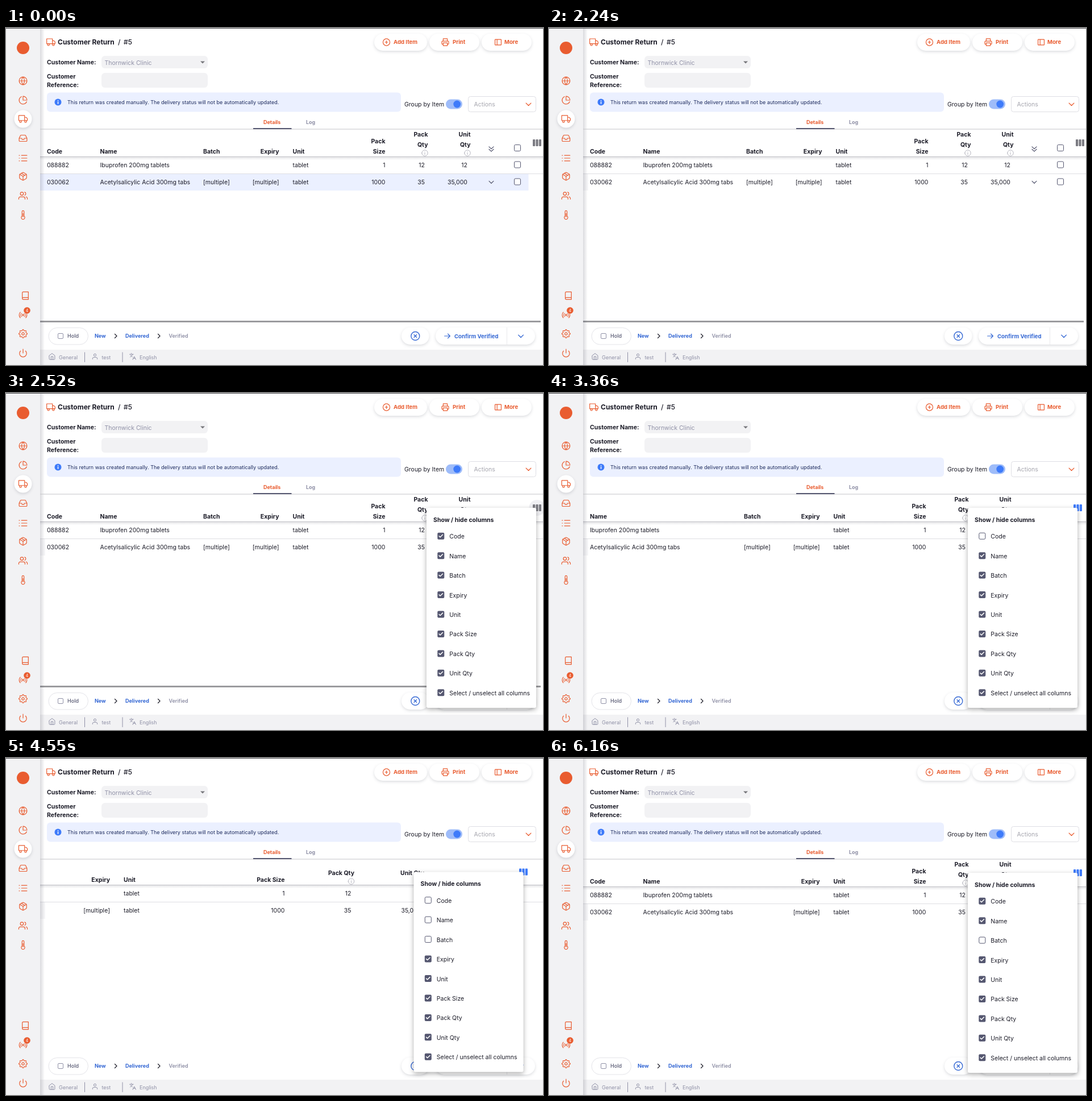
These frames come from a looping animation (945 px wide and 593 px high, 6.93 s). An HTML page:

```html
<!DOCTYPE html>
<html lang="en">
<head>
<meta charset="utf-8">
<title>Customer Return</title>
<style>
html, body { margin: 0; width: 100%; height: 100%; overflow: hidden; background: #fff; }
svg { display: block; width: 100vw; height: 100vh; font-family: Inter, sans-serif; }
text { white-space: pre; }
.lift { filter: drop-shadow(0 2px 2.5px rgba(40, 41, 61, .16)); }
.paper { filter: drop-shadow(0 3px 4px rgba(0, 0, 0, .32)); }
</style>
</head>
<body>
<svg viewBox="0 0 945 593">
  <defs>
    <linearGradient id="side"><stop stop-color="#28293d" stop-opacity=".17"/><stop offset="1" stop-color="#28293d" stop-opacity="0"/></linearGradient>
    <linearGradient id="under" x2="0" y2="1"><stop stop-color="#28293d" stop-opacity=".13"/><stop offset="1" stop-color="#28293d" stop-opacity="0"/></linearGradient>
  </defs>
  <g id="table"></g>
  <g id="chrome"></g>
  <g id="menu"></g>
</svg>
<script>
const LOOP = 6930, STEP = 70;
const INK = '#1c1c28', GREY = '#8f90a6', SLATE = '#555770', BLUE = '#3e7bfa', LINK = '#3568d4',
      ORANGE = '#e95c30', PANEL = '#f2f2f4', TINT = '#ebf0ff';
const $ = id => document.getElementById(id);

// Text is placed by the middle of its capitals.
const text = (x, y, str, { size = 10.5, weight = 400, fill = INK, anchor = 'start' } = {}) =>
  `<text x="${x}" y="${y + size * .364}" font-size="${size}" font-weight="${weight}" fill="${fill}" text-anchor="${anchor}">${str}</text>`;
const bold = (x, y, str, o) => text(x, y, str, { weight: 700, ...o });
const rect = (x, y, w, h, fill, rx = 0, more = '') =>
  `<rect x="${x}" y="${y}" width="${w}" height="${h}" rx="${rx}" fill="${fill}" ${more}/>`;
const disc = (x, y, r, fill, more = '') => `<circle cx="${x}" cy="${y}" r="${r}" fill="${fill}" ${more}/>`;
const ring = (x, y, r) => `M${x - r} ${y}a${r} ${r} 0 1 0 ${2 * r} 0a${r} ${r} 0 1 0 ${-2 * r} 0z`;

const gear = Array.from({ length: 97 }, (_, i) => {
  const a = i / 96 * 2 * Math.PI, r = 9.4 + 1.4 * Math.cos(8 * a);
  return `${i ? 'L' : 'M'}${(12 + r * Math.cos(a)).toFixed(2)} ${(12 + r * Math.sin(a)).toFixed(2)}`;
}).join('');

const shapes = {
  globe: ring(12, 12, 10) + 'M2 12h20M12 2a15.3 15.3 0 0 1 0 20a15.3 15.3 0 0 1 0-20z',
  pie: 'M21.2 15.9A10 10 0 1 1 8 2.8M22 12A10 10 0 0 0 12 2v10z',
  truck: 'M1 3h15v13H1zM16 8h4l3 3v5h-7z' + ring(5.5, 18.5, 2.5) + ring(18.5, 18.5, 2.5),
  inbox: 'M22 12h-6l-2 3h-4l-2-3H2M5.4 5.1L2 12v6a2 2 0 0 0 2 2h16a2 2 0 0 0 2-2v-6l-3.4-6.9A2 2 0 0 0 16.8 4H7.2a2 2 0 0 0-1.8 1.1z',
  list: 'M8 5h14M8 12h14M8 19h14M2 5h1M2 12h1M2 19h1',
  box: 'M16.5 9.4l-9-5.2M21 16V8l-1-1.7-7-4h-2l-7 4L3 8v8l1 1.7 7 4h2l7-4zM3.3 7L12 12l8.7-5M12 22V12',
  users: 'M17 21v-2a4 4 0 0 0-4-4H5a4 4 0 0 0-4 4v2M23 21v-2a4 4 0 0 0-3-3.9M16 3.1a4 4 0 0 1 0 7.8' + ring(9, 7, 4),
  thermo: 'M14.5 14.8V3.5a2.5 2.5 0 0 0-5 0v11.3a4.5 4.5 0 1 0 5 0zM12 8v9',
  book: 'M4 19.5A2.5 2.5 0 0 1 6.5 17H20M6.5 2H20v20H6.5A2.5 2.5 0 0 1 4 19.5v-15A2.5 2.5 0 0 1 6.5 2z',
  radio: ring(12, 12, 2) + 'M16.2 7.8a6 6 0 0 1 0 8.4M7.8 16.2a6 6 0 0 1 0-8.4M19 5a10 10 0 0 1 0 14M5 19a10 10 0 0 1 0-14',
  gear: gear + ring(12, 12, 3.2),
  power: 'M18.4 6.6a9 9 0 1 1-12.8 0M12 2v10',
  home: 'M3 9l9-7 9 7v11a2 2 0 0 1-2 2H5a2 2 0 0 1-2-2zM9 22V12h6v10',
  user: 'M20 21v-2a4 4 0 0 0-4-4H8a4 4 0 0 0-4 4v2' + ring(12, 7, 4),
  language: 'M5 8l6 6M4 14l6-6 2-3M2 5h12M7 2h1M22 22l-5-10-5 10M14 18h6',
  printer: 'M6 9V2h12v7M6 18H4a2 2 0 0 1-2-2v-5a2 2 0 0 1 2-2h16a2 2 0 0 1 2 2v5a2 2 0 0 1-2 2h-2M6 14h12v8H6z',
  panel: 'M4 4h16a1 1 0 0 1 1 1v14a1 1 0 0 1-1 1H4a1 1 0 0 1-1-1V5a1 1 0 0 1 1-1zM9 4v16',
  plus: ring(12, 12, 10) + 'M12 8v8M8 12h8',
  cancel: ring(12, 12, 10) + 'M15 9l-6 6M9 9l6 6',
  info: ring(12, 12, 10) + 'M12 11v6M12 7v.5',
  arrow: 'M3 12h18M14 5l7 7-7 7',
  down: 'M5 9l7 7 7-7',
  right: 'M9 5l7 7-7 7',
  downs: 'M5 12.5l7 6.5 7-6.5M5 5l7 6.5L19 5',
  check: 'M20 6L9 17l-5-5'
};
const icon = (name, x, y, size, color = ORANGE, width = 1.2) =>
  `<path d="${shapes[name]}" transform="translate(${x - size / 2} ${y - size / 2}) scale(${size / 24})" fill="none" stroke="${color}" stroke-width="${width * 24 / size}" stroke-linecap="round" stroke-linejoin="round"/>`;
const checkbox = (x, y, on, s = 11) => on
  ? rect(x - 6, y - 6, 12, 12, SLATE, 2) + icon('check', x, y, 9.5, '#fff', 1.5)
  : rect(x - s / 2, y - s / 2, s, s, '#fff', 2, `stroke="${SLATE}"`);
const pill = (x, y, w, h, more = 'class="lift"') => rect(x, y, w, h, '#fff', h / 2, more);

function chrome() {
  const small = { size: 9 }, label = { size: 9.6, fill: ORANGE }, foot = { size: 9, fill: GREY };
  const nav = [['globe', 93], ['pie', 127], ['truck', 160], ['inbox', 194], ['list', 229], ['box', 261],
               ['users', 295], ['thermo', 329], ['radio', 505], ['gear', 538], ['power', 572]];
  const buttons = [[648, 93, 'plus', 669.5, 682, 'Add Item'], [745, 88, 'printer', 773, 786, 'Print'],
                   [837, 88, 'panel', 866, 877, 'More']];
  return rect(60, 566, 885, 27, PANEL) + rect(60, 0, 8, 593, 'url(#side)') + rect(0, 0, 60, 593, PANEL)
    + rect(0, 0, 945, 1, '#4c4c50')
    + disc(30, 35, 11, ORANGE) + disc(30, 160, 15.5, '#fff', 'class="lift"')
    + nav.map(([name, y]) => icon(name, 30, y, 16.5)).join('')
    + icon('book', 34, 471, 16) + disc(37, 497, 5.8, ORANGE)
    + text(37, 497, '4', { size: 7, fill: '#fff', anchor: 'middle' })
    // page head
    + icon('truck', 79, 25, 16) + bold(91, 24.5, 'Customer Return', { size: 12 })
    + text(197, 24.5, '/', { size: 12, weight: 500 }) + text(207, 24.5, '#5', { size: 12, weight: 500 })
    + buttons.map(([x, w, name, ix, tx, s]) =>
        pill(x, 10, w, 30) + icon(name, ix, 25, 14.5) + bold(tx, 25, s, label)).join('')
    + bold(72, 60, 'Customer Name:') + bold(72, 85, 'Customer') + bold(72, 100, 'Reference:')
    + rect(168, 49, 187, 22, PANEL, 6) + rect(168, 79, 187, 26, PANEL, 6)
    + text(173.5, 61.5, 'Thornwick Clinic', { fill: GREY })
    + '<path d="M342 58.5h8l-4 4z" fill="#77777c"/>'
    + rect(72, 113.5, 623, 34, TINT, 6) + disc(91.5, 130.5, 6, BLUE)
    + rect(90.8, 129.5, 1.5, 4.2, '#fff') + rect(90.8, 127, 1.5, 1.5, '#fff')
    + text(108, 130.5, 'This return was created manually. The delivery status will not be automatically updated.', { size: 9, fill: '#1d2b5c' })
    + text(701, 134, 'Group by Item') + rect(774, 125.5, 29, 17, '#9ebcf9', 8.5) + disc(793.7, 134, 6.4, BLUE)
    + rect(813.5, 120.5, 119, 27, '#fff', 4, 'stroke="#dedee4"') + text(823.5, 134, 'Actions', { fill: '#a5a5ae' })
    + icon('down', 919.5, 134, 15, ORANGE, 1.4)
    + bold(453, 166, 'Details', { size: 9, fill: ORANGE }) + bold(528, 166, 'Log', { size: 9, fill: GREY })
    + rect(60, 177.5, 885, 1, '#c5c5ca') + rect(435, 176, 67.5, 2, SLATE)
    // status bar
    + pill(75, 527.5, 69.5, 29.5, 'stroke="#e4e4e9"') + rect(91.5, 537.5, 9, 9, '#fff', 1.5, `stroke="${GREY}"`)
    + text(108, 542, 'Hold', { size: 9, weight: 500, fill: SLATE })
    + bold(156, 542, 'New', { size: 9, fill: LINK }) + icon('right', 193, 542, 12, INK)
    + bold(210, 542, 'Delivered', { size: 9, fill: LINK }) + icon('right', 269, 542, 12, INK)
    + text(286.5, 542, 'Verified', { size: 9, weight: 600, fill: GREY })
    + pill(696, 527, 48.5, 30) + icon('cancel', 720.3, 542, 18, LINK, 1.4)
    + pill(756, 527, 175, 30) + rect(881, 527, 1, 30, '#e8e8ec')
    + icon('arrow', 776.5, 542, 13, LINK) + bold(789, 542.5, 'Confirm Verified', { size: 9.6, fill: LINK })
    + icon('down', 906, 542, 15, LINK, 1.4)
    + icon('home', 81, 578, 13, GREY, 1) + text(93, 579.5, 'General', foot) + rect(138, 570.5, 1, 17.5, GREY)
    + icon('user', 156.5, 578, 12.5, GREY, 1) + text(168.5, 579.5, 'test', foot) + rect(204.5, 570.5, 1, 17.5, GREY)
    + icon('language', 223, 578, 13, GREY, 1) + text(235, 579.5, 'English', foot);
}

const NAMES = ['Code', 'Name', 'Batch', 'Expiry', 'Unit', 'Pack Size', 'Pack Qty', 'Unit Qty'];
// left: Code, Name, Batch, Unit; right: Expiry, Pack Size, Pack Qty, Unit Qty
const full = { code: 72, name: 165.5, batch: 347, expiry: 480.5, unit: 504.5, size: 667.5, pack: 742.5, qty: 817.5,
               icon: 0, menu: 740, off: '' };
const snug = { ...full, expiry: 476.5, unit: 500.5, size: 663.5, pack: 738.5, qty: 813.5, icon: -4, menu: 737 };
const views = [
  [0, full],
  [3360, { ...snug, code: 0, name: 72, batch: 343, off: 'Code' }],
  [3850, { wide: 1, batch: 72, expiry: 282, unit: 306, size: 549, pack: 656, qty: 763, icon: -17, menu: 724.5, off: 'Code Name' }],
  [4550, { wide: 1, expiry: 183, unit: 207, size: 490.5, pack: 613, qty: 736, icon: -24, menu: 717.5, off: 'Code Name Batch' }],
  [5320, { wide: 1, code: 72, expiry: 284, unit: 308, size: 550, pack: 657, qty: 764, icon: -16, menu: 725.5, off: 'Name Batch' }],
  [5950, { ...snug, batch: 0, off: 'Batch' }]
];

function table(v, t) {
  const dy = v.wide ? -3 : 0, end = { anchor: 'end' };
  const left = (x, y, s, draw = text) => x ? draw(x, y + dy, s) : '';
  const right = (x, y, s, draw = text) => draw(x, y + dy, s, end);
  const head = (x, y, a, b) => v.wide ? bold(x, y, `${a} ${b}`, end)
    : bold(x, y - (y > 210 ? 18 : 15), a, end) + bold(x, y + (y > 210 ? 0 : 3), b, end);
  const qtyHead = (x, a) => head(x, 202, a, 'Qty') + icon('info', x - 5.5, 220 + dy, 12.5, '#a5a5b0', .8);
  const row = (y, code, name, multi, size, pack, qty) =>
    left(v.code, y, code) + left(v.name, y, name)
    + (multi ? left(v.batch, y, '[multiple]') + right(v.expiry, y, '[multiple]') + icon('down', 854 + v.icon, y + dy, 13.5, SLATE, 1.2) : '')
    + left(v.unit, y, 'tablet') + right(v.size, y, size) + right(v.pack - 5.5, y, pack) + right(v.qty - 5.5, y, qty)
    + checkbox(900 + v.icon, y - .5 + dy, false);
  const bars = [927, 932.4, 937.8].map(x =>
    rect(x + v.icon, 196 + dy / 2, 4.2, 12, v.off ? BLUE : '#7b7b82', 1)).join('');
  return (t < 2240 ? rect(60, 256, 859.5, 30, TINT) : rect(60, 256 + dy, 9, 30, '#f6f6f8'))
    + rect(60, 226.5 + dy, 885, 6, 'url(#under)') + rect(60, 226 + dy, 885, 1, '#c0c0c6')
    + rect(60, 256 + dy, 885, 1, '#dedee3')
    + left(v.code, 217, 'Code', bold) + left(v.name, 217, 'Name', bold) + left(v.batch, 217, 'Batch', bold)
    + right(v.expiry, 217, 'Expiry', bold) + left(v.unit, 217, 'Unit', bold)
    + head(v.size, 217 + dy, 'Pack', 'Size') + qtyHead(v.pack, 'Pack') + qtyHead(v.qty, 'Unit')
    + icon('downs', 854 + v.icon, 213 + dy, 14, SLATE) + checkbox(900 + v.icon, 211 + dy, false)
    + (t > 2240 && t < 3360 ? disc(934.5, 202, 14, '#f0f0f3') : '') + bars
    + row(241, '088882', 'Ibuprofen 200mg tablets', false, '1', '12', '12')
    + row(271, '030062', 'Acetylsalicylic Acid 300mg tabs', true, '1000', '35', '35,000')
    + (v.off ? '' : rect(60, 515, 881, 3, '#9b9b9e'));
}

function menu(v, t) {
  if (t <= 2240) return '';
  const p = Math.min(1, (t - 2240) / 280), ease = 1 - (1 - p) ** 3;
  const off = v.off.split(' ');
  const items = [...NAMES, 'Select / unselect all columns'].map((s, i) => {
    const y = 50 + i * 34.45;
    return checkbox(25.3, y - .3, !off.includes(s)) + text(40.3, y + .4, s);
  }).join('');
  const x = v.menu + 193, y = 202 + (v.wide ? -1.5 : 0);
  return `<g opacity="${ease}" transform="translate(${x} ${y}) scale(${.75 + .25 * ease} ${.5625 + .4375 * ease}) translate(-193 0)">`
    + rect(0, 0, 193, 352, '#fff', 3, 'class="paper"') + bold(12, 21, 'Show / hide columns') + items + '</g>';
}

$('chrome').innerHTML = chrome();
let last = -1;
function draw(now) {
  const t = Math.floor(now % LOOP / STEP) * STEP;
  if (t !== last) {
    const view = views.filter(([start]) => t >= start).pop()[1];
    $('table').innerHTML = table(view, t);
    $('menu').innerHTML = menu(view, t);
    last = t;
  }
  requestAnimationFrame(draw);
}
draw(performance.now());
</script>
</body>
</html>
```
